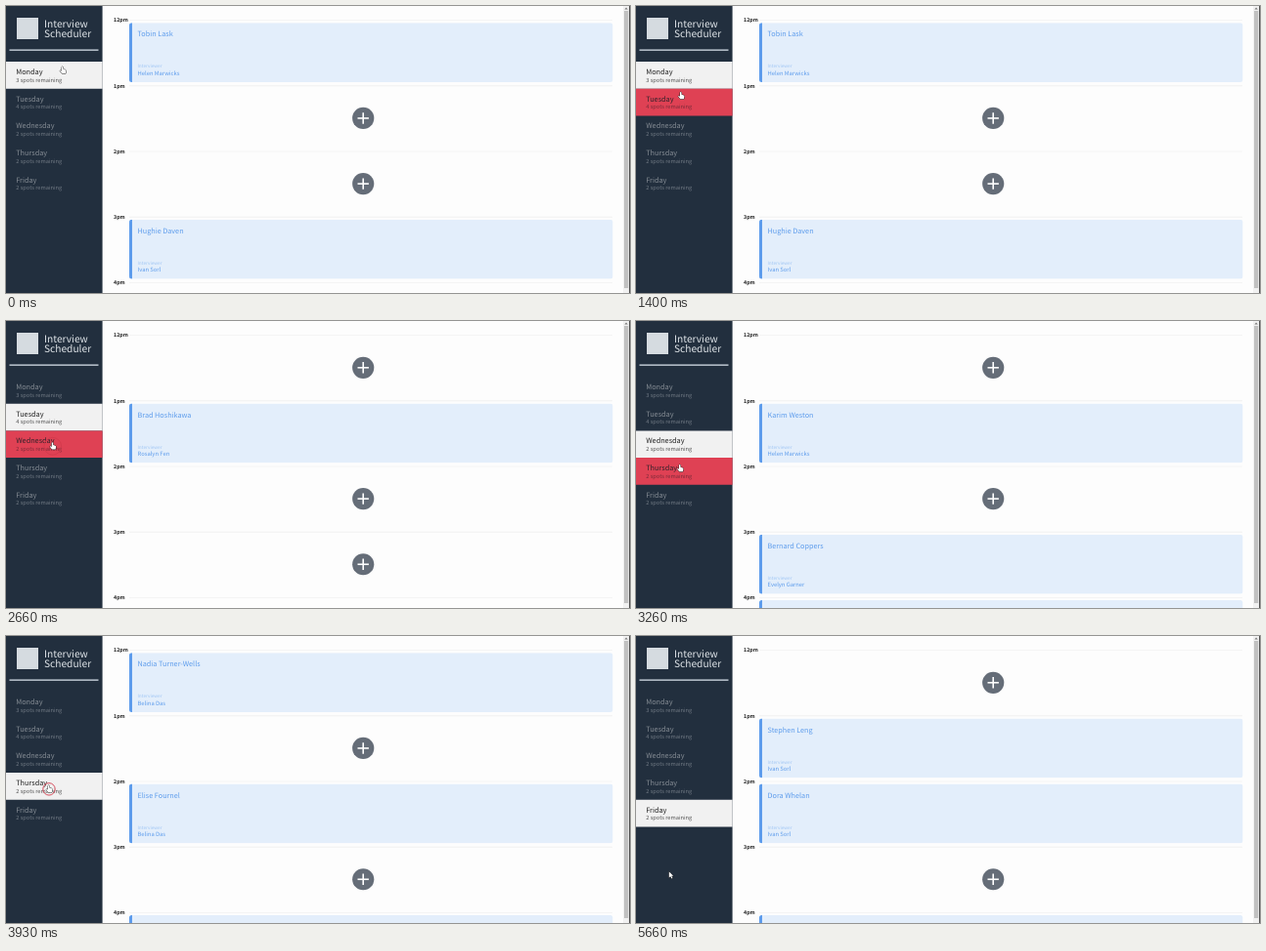
These frames come from a looping animation (638x294 px, 5730 ms). An HTML page with a canvas:

```html
<!DOCTYPE html>
<html lang="en">
<head>
<meta charset="utf-8">
<title>Interview Scheduler</title>
<style>
html, body { margin: 0; width: 100%; height: 100%; overflow: hidden; background: #fdfdfd; }
canvas { display: block; }
</style>
</head>
<body>
<canvas id="stage" width="638" height="294"></canvas>
<script>
const ctx = document.getElementById('stage').getContext('2d');
const FONT = '"Noto Sans CJK JP", "Noto Sans CJK SC", "Noto Sans CJK", "Open Sans", sans-serif';
const LOOP = 5730, STEP = LOOP / 90;
const ITEM_TOP = 57, ITEM_H = 27.7, ROW_H = 67.15;
const BLUE = '#5d9cec', RED = '#df4154', NAVY = '#222f3e';

// Each booking: row, client, interviewer
const days = [
  { name: 'Monday', spots: 3, cards: [[0, 'Tobin Lask', 'Helen Marwicks'], [3, 'Hughie Daven', 'Ivan Sorl']] },
  { name: 'Tuesday', spots: 4, cards: [[1, 'Brad Hoshikawa', 'Rosalyn Fen']] },
  { name: 'Wednesday', spots: 2, cards: [[1, 'Karim Weston', 'Helen Marwicks'], [3, 'Bernard Coppers', 'Evelyn Garner'], [4, '', '']] },
  { name: 'Thursday', spots: 2, cards: [[0, 'Nadia Turner-Wells', 'Belina Das'], [2, 'Elise Fournel', 'Belina Das'], [4, '', '']] },
  { name: 'Friday', spots: 2, cards: [[1, 'Stephen Leng', 'Ivan Sorl'], [2, 'Dora Whelan', 'Ivan Sorl'], [4, '', '']] },
];
const hours = ['12pm', '1pm', '2pm', '3pm', '4pm'];

// Press times for Tuesday to Friday; the day changes shortly after
const clicks = [1960, 2600, 3700, 4740];
const LAG = 130, RING = 330;

// Pointer path: time, x, y
const path = [
  [0, 58, 66], [900, 57, 67], [1390, 46, 92], [2080, 46, 93], [2420, 48, 128],
  [2980, 47, 129], [3240, 45, 151], [3640, 44, 156], [3960, 44, 157],
  [4170, 43, 180], [4950, 43, 182], [5480, 35, 245], [LOOP, 35, 245],
];

function pointerAt(t) {
  const i = path.findIndex(p => p[0] > t);
  const [t0, x0, y0] = path[i - 1], [t1, x1, y1] = path[i];
  const u = (t - t0) / (t1 - t0), e = u * u * (3 - 2 * u);
  return [x0 + (x1 - x0) * e, y0 + (y1 - y0) * e];
}

function text(str, x, y, size, color, weight = 400) {
  ctx.font = `${weight} ${size}px ${FONT}`;
  ctx.fillStyle = color;
  ctx.fillText(str, x, y);
}

function rect(x, y, w, h, color, radius = 0) {
  ctx.fillStyle = color;
  ctx.beginPath();
  ctx.roundRect(x, y, w, h, radius);
  ctx.fill();
}

function circle(x, y, r) {
  ctx.beginPath();
  ctx.arc(x, y, r, 0, 7);
}

function drawSidebar(selected, hovered) {
  rect(0, 0, 98.6, 294, NAVY);
  rect(11, 12, 22, 22, '#d5dbe0');
  text('Interview', 39, 22.3, 10.2, '#dfe4e8', 300);
  text('Scheduler', 39, 32.3, 10.2, '#dfe4e8', 300);
  rect(3.5, 44.5, 91, 1.2, '#dce6ee');
  days.forEach((day, i) => {
    const y = ITEM_TOP + i * ITEM_H;
    let colors = ['#858c94', '#707983'];
    if (i === selected) {
      rect(0, y, 98.6, ITEM_H, '#f1f1f1');
      colors = ['#222222', '#555555'];
    } else if (i === hovered) {
      rect(0, y, 98.6, ITEM_H, RED);
      colors = ['#33232b', '#7d2c3a'];
    }
    text(day.name, 10.2, y + 13, 7.3, colors[0]);
    text(day.spots + ' spots remaining', 10.2, y + 20.6, 5.7, colors[1], 300);
  });
}

function drawCard(y, client, interviewer) {
  ctx.save();
  ctx.beginPath();
  ctx.roundRect(126, y, 494.3, 60.7, 2.5);
  ctx.clip();
  rect(126, y, 495, 61, '#e3eefb');
  rect(126, y, 3, 61, BLUE);
  ctx.restore();
  text(client, 134.5, y + 14.1, 7.25, BLUE);
  text('Interviewer', 134.5, y + 46.1, 4.7, '#a0c6f4', 300);
  text(interviewer, 134.5, y + 53.3, 5.85, BLUE);
}

function drawAdd(y) {
  ctx.fillStyle = '#656d78';
  circle(365.2, y, 11.1);
  ctx.fill();
  rect(359.5, y - 0.8, 11.4, 1.6, '#fff');
  rect(364.4, y - 5.7, 1.6, 11.4, '#fff');
}

function drawSchedule(day) {
  hours.forEach((hour, row) => {
    const y = 14.4 + row * ROW_H;
    text(hour, 110, y + 2, 5.3, '#222', 700);
    rect(126, y, 494, 0.6, '#ececec');
    const card = day.cards.find(c => c[0] === row);
    if (card) drawCard(y + 2.9, card[1], card[2]);
    else drawAdd(y + 33.4);
  });
}

function drawScrollbar() {
  rect(631, 0, 7, 294, '#f1f1f1');
  rect(632, 5, 4.2, 284, '#c1c1c1');
  ctx.fillStyle = '#777';
  ctx.fill(new Path2D('M632.4 3.4h3.4l-1.7-2z'));
  rect(637, 0, 1, 294, '#555');
}

const hand = new Path2D('M-1-3.5q.8-.8 1.5 0v2.3l2.2.6q.8.3.7 1.2l-.5 2.7h-3.6l-2-2.5q-.3-1 .6-.8l1.1.7z');
const arrow = new Path2D('M-1.2-3.5v6l1.5-1.3 1.1 2.3 1-.5-1.1-2.2h1.9z');

function drawPointer(x, y, shape) {
  ctx.save();
  ctx.translate(x, y);
  ctx.lineWidth = 0.9;
  ctx.strokeStyle = '#222';
  ctx.stroke(shape);
  ctx.fillStyle = '#fff';
  ctx.fill(shape);
  ctx.restore();
}

function drawRing(x, y, t) {
  const start = clicks.find(c => t >= c && t < c + RING);
  if (start === undefined) return;
  ctx.strokeStyle = '#d23a4c';
  ctx.lineWidth = 0.9;
  circle(x, y, 9 - 5 * (t - start) / RING);
  ctx.stroke();
}

function draw(now) {
  const t = Math.floor(now % LOOP / STEP + 0.1) % 90 * STEP;
  const selected = clicks.filter(c => t >= c + LAG).length;
  const [x, y] = pointerAt(t);
  const hovered = Math.floor((y - ITEM_TOP) / ITEM_H);
  rect(0, 0, 638, 294, '#fdfdfd');
  drawSchedule(days[selected]);
  drawSidebar(selected, hovered);
  drawScrollbar();
  drawRing(x, y, t);
  drawPointer(x, y, days[hovered] ? hand : arrow);
}

ctx.textRendering = 'geometricPrecision';
const begin = performance.now();
function tick() {
  draw(performance.now() - begin);
  requestAnimationFrame(tick);
}
tick();
</script>
</body>
</html>
```
